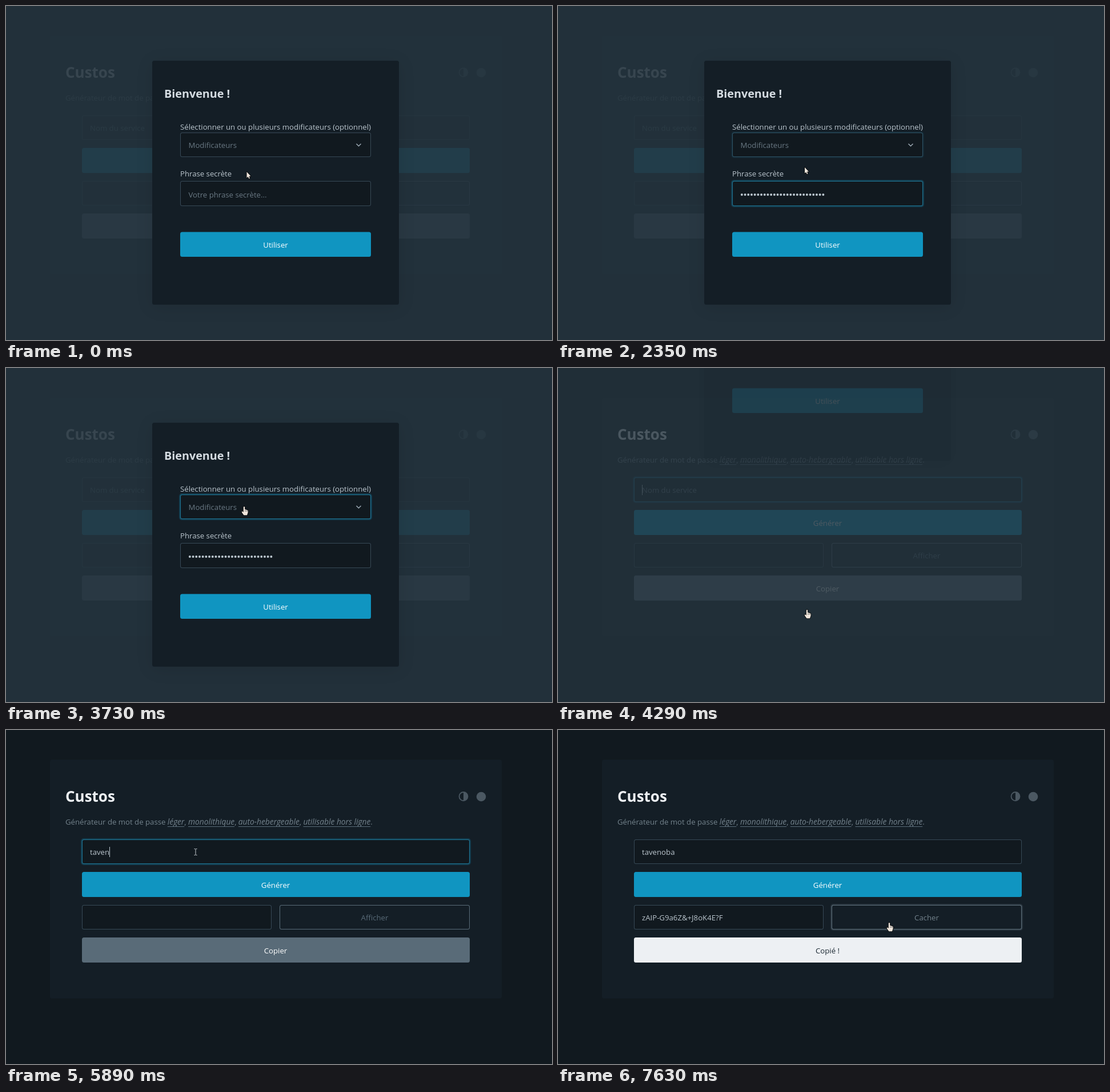
Write an HTML page with a canvas that moves like this. It is 956 by 586 pixels and loops after 8000 ms.

```html
<!DOCTYPE html>
<html lang="fr">
<head>
<meta charset="utf-8">
<title>Custos</title>
<style>
html, body { margin: 0; width: 100%; height: 100%; overflow: hidden; background: #11191f; }
canvas { display: block; width: 956px; height: 586px; }
</style>
</head>
<body>
<canvas id="stage" width="956" height="586"></canvas>
<script>
const W = 956, H = 586, LOOP = 8000;
const screen2d = document.getElementById('stage').getContext('2d');
const layer = document.createElement('canvas');
layer.width = W;
layer.height = H;
const layer2d = layer.getContext('2d');
let c = screen2d;

const BG = '#11191f', CARD = '#141e26', BLUE = '#1095c1', BORDER = '#374956';
const TEXT = '#bbc6ce', MUTED = '#73828c', HINT = '#697883', GREY = '#596b78', PALE = '#edf0f3';
const FAMILY = '"Open Sans", "Noto Sans", sans-serif';
const SERVICE = 'tavenoba', PASSWORD = 'zAIP-G9a6Z&+J8oK4E?F';
const KEY_TIMES = [5440, 5480, 5620, 5700, 5890, 5930, 6070, 6210];
const DOT = 5.7;

// time, x, y of the pointer's hot spot
const POINTER = [
  [0, 421.5, 291], [70, 421.5, 291], [200, 421, 336], [1840, 421, 336],
  [2350, 432, 283], [2480, 424, 248], [2660, 424, 248], [3100, 430, 414],
  [3430, 424, 330], [3480, 424, 330], [3700, 417, 243], [3790, 417, 243],
  [4060, 436, 424], [4340, 436, 424], [4880, 332, 214], [7110, 332, 214],
  [7440, 580, 338], [8000, 580, 338]
];

const ramp = (t, a, b) => Math.min(1, Math.max(0, (t - a) / (b - a)));
const ease = (t, a, b) => { const k = ramp(t, a, b); return k * k * (3 - 2 * k); };
const within = (v, a, b) => v >= a && v < b;

function font(size = 13.2, style = '') {
  c.font = `${style} ${size}px ${FAMILY}`;
}

function write(str, x, y, color, align = 'left') {
  c.fillStyle = color;
  c.textAlign = align;
  c.fillText(str, x, y);
}

function round(x, y, w, h, color, r = 3.5) {
  c.fillStyle = color;
  c.beginPath();
  c.roundRect(x, y, w, h, r);
  c.fill();
}

function box(x, y, w, h, border, fill, focus = 0, accent = BLUE) {
  if (focus > 0) {
    c.globalAlpha = 0.25 * focus;
    round(x - 2, y - 2, w + 4, h + 4, accent, 5);
    c.globalAlpha = 1;
  }
  round(x, y, w, h, border);
  if (focus > 0) {
    c.globalAlpha = 0.6 * focus;
    round(x, y, w, h, accent);
    c.globalAlpha = 1;
  }
  round(x + 1, y + 1, w - 2, h - 2, fill, 2.5);
}

function dots(n, x, y) {
  c.fillStyle = TEXT;
  c.beginPath();
  for (let i = 0; i < n; i++) {
    const cx = x + DOT * (i + 0.5);
    c.moveTo(cx + 2, y);
    c.arc(cx, y, 2, 0, 7);
  }
  c.fill();
}

function caret(x, y) {
  c.fillStyle = TEXT;
  c.fillRect(Math.round(x), y, 1, 18);
}

function subtitle() {
  let x = 104;
  const run = (str, linked) => {
    if (linked) font(13.8, 'italic');
    else font();
    write(str, x, 166, MUTED);
    const w = c.measureText(str).width;
    if (linked) {
      c.fillStyle = GREY;
      c.fillRect(x, 169, w, 1);
    }
    x += w;
  };
  run('Générateur de mot de passe ');
  run('léger', true);
  run(', ');
  run('monolithique', true);
  run(', ');
  run('auto-hebergeable', true);
  run(', ');
  run('utilisable hors ligne', true);
  run('.');
}

function icons() {
  c.fillStyle = c.strokeStyle = '#4b5862';
  c.lineWidth = 1.8;
  c.beginPath();
  c.arc(801, 116.5, 7.5, 0, 7);
  c.stroke();
  c.beginPath();
  c.arc(801, 116.5, 7.5, -Math.PI / 2, Math.PI / 2);
  c.fill();
  c.beginPath();
  c.arc(832, 117, 8.3, 0, 7);
  c.fill();
}

function page(t) {
  c.fillStyle = BG;
  c.fillRect(0, 0, W, H);
  round(77, 52, 791, 419, CARD);
  font(26, 'bold');
  write('Custos', 104, 125.5, PALE);
  icons();
  subtitle();

  const done = t >= 6480, shown = t >= 7470;
  const focus = ease(t, 4150, 4250) * (1 - ease(t, 6460, 6610));
  box(133, 192, 679, 43, BORDER, BG, focus);
  font();
  const typed = SERVICE.slice(0, KEY_TIMES.filter(k => k <= t).length);
  write(typed || 'Nom du service', 147, 219, typed ? TEXT : HINT);
  if (within(t, 4180, 4660) || within(t, 5160, 6480)) {
    caret(147 + c.measureText(typed).width, 205);
  }

  round(133, 249, 679, 44, BLUE);
  write('Générer', 472, 277, '#fff', 'center');

  box(133, 307, 332, 43, BORDER, BG);
  if (shown) {
    write(PASSWORD, 147, 334, TEXT);
  } else if (done) {
    c.fillStyle = '#113a4b';
    c.fillRect(147, 319, 114, 19);
    dots(PASSWORD.length, 147, 329);
  }

  box(479, 307, 333, 43, GREY, CARD, ease(t, 7450, 7630), '#65757f');
  write(shown ? 'Cacher' : 'Afficher', 645.5, 334, shown ? MUTED : GREY, 'center');

  round(133, 364, 679, 44, GREY);
  if (done) {
    c.globalAlpha = 0.25 + 0.75 * ease(t, 6480, 6610);
    round(133, 364, 679, 44, PALE);
    c.globalAlpha = 1;
  }
  write(done ? 'Copié !' : 'Copier', 472, 391.5, done ? '#1b2832' : '#fff', 'center');
}

function dropdown(t) {
  const py = pointer(t).y;
  c.shadowColor = 'rgba(0,0,0,.3)';
  c.shadowBlur = 14;
  round(305, 269, 334, 210, '#24333e');
  c.shadowColor = 'transparent';
  round(306, 270, 332, 208, '#1b2832', 2.5);
  const row = Math.floor((py - 275) / 39.6);
  if (row >= 0 && row < 5) {
    c.fillStyle = '#24333e';
    c.fillRect(306, 275 + row * 39.6, 332, 39.6);
  }
}

function modal(t) {
  c.clearRect(0, 0, W, H);
  c.shadowColor = 'rgba(0,0,0,.1)';
  c.shadowBlur = 30;
  c.shadowOffsetY = 4;
  round(256, 96, 432, 428, CARD);
  c.shadowColor = 'transparent';
  c.shadowOffsetY = 0;

  font(19.75, 'bold');
  write('Bienvenue !', 277, 161, '#d5dce2');
  font();
  write('Sélectionner un ou plusieurs modificateurs (optionnel)', 305, 217, TEXT);
  box(305, 222, 334, 43, BORDER, BG, ease(t, 2290, 2460) * (1 - ease(t, 4060, 4150)));
  write('Modificateurs', 319.5, 249, HINT);
  c.strokeStyle = '#a2afb9';
  c.lineWidth = 1.4;
  c.beginPath();
  c.moveTo(613.5, 241.7);
  c.lineTo(617.5, 245.7);
  c.lineTo(621.5, 241.7);
  c.stroke();

  write('Phrase secrète', 305, 299, TEXT);
  box(305, 307, 334, 44, BORDER, BG, ease(t, 330, 500) * (1 - ease(t, 2340, 2480)));
  if (t < 720) {
    write('Votre phrase secrète...', 319.5, 335.5, HINT);
  }
  const n = t < 720 ? 0 : t >= 1600 ? 26 : 1 + Math.floor(23 * ramp(t, 720, 1460));
  dots(n, 319, 331);
  if (within(t, 340, 2100)) caret(319 + n * DOT, 321);

  round(305, 396.5, 334, 43.5, BLUE);
  write('Utiliser', 472, 424, '#fff', 'center');
  if (within(t, 2400, 3700)) dropdown(t);
}

function pointer(t) {
  let i = 0;
  while (i < POINTER.length - 2 && POINTER[i + 1][0] <= t) i++;
  const [t0, x0, y0] = POINTER[i], [t1, x1, y1] = POINTER[i + 1];
  const k = ease(t, t0, t1);
  return { x: x0 + (x1 - x0) * k, y: y0 + (y1 - y0) * k };
}

function pointerKind(t, x, y) {
  if (t < 4330) {
    if (within(y, 222, 266) || within(y, 397, 440)) return 'hand';
    if (within(t, 2400, 3700) && within(y, 269, 479)) return 'hand';
    return within(y, 307, 351) ? 'beam' : 'arrow';
  }
  if (within(y, 192, 235)) return 'beam';
  if (within(y, 249, 293) || within(y, 364, 408)) return 'hand';
  if (within(y, 307, 350)) return x < 465 ? 'beam' : x >= 479 ? 'hand' : 'arrow';
  return 'arrow';
}

const SHAPES = {
  arrow: [0, 0, 0, 10.5, 2.3, 8.4, 3.9, 12, 5.5, 11.3, 4, 7.8, 7, 7.5],
  hand: [-1.2, .8, 0, 0, 1.2, .8, 1.2, 5, 5.8, 6.2, 6.8, 7.5, 6.5, 11, 5, 15.2,
    -.6, 15.2, -4, 10.5, -4.2, 8.8, -3, 8.4, -1.2, 10]
};

function drawPointer(t) {
  const { x, y } = pointer(t), kind = pointerKind(t, x, y);
  c.save();
  c.translate(x, y);
  c.lineJoin = 'round';
  c.beginPath();
  if (kind === 'beam') {
    c.fillStyle = '#c9ced2';
    c.fillRect(-0.5, -5, 1, 10);
    for (const dy of [-6, 5]) {
      c.fillRect(-2.5, dy, 2, 1);
      c.fillRect(0.5, dy, 2, 1);
    }
  } else {
    const p = SHAPES[kind];
    for (let i = 0; i < p.length; i += 2) c.lineTo(p[i], p[i + 1]);
    c.closePath();
    c.strokeStyle = '#05080a';
    c.lineWidth = 1.8;
    c.stroke();
    c.fillStyle = '#f0e6dc';
    c.fill();
    if (kind === 'hand') {
      c.fillStyle = '#30363a';
      for (const fx of [1.4, 3.2, 5]) c.fillRect(fx, 6.4, 0.6, 2.6);
    }
  }
  c.restore();
}

function draw(t) {
  c = screen2d;
  page(t);
  const veil = 0.9 * (1 - ease(t, 4240, 4500));
  if (veil > 0) {
    c.fillStyle = `rgba(36,51,61,${veil})`;
    c.fillRect(0, 0, W, H);
  }
  const lift = ease(t, 4141, 4341);
  if (lift < 1) {
    c = layer2d;
    modal(t);
    c = screen2d;
    c.globalAlpha = 1 - lift;
    c.drawImage(layer, 0, Math.round(-428 * lift));
    c.globalAlpha = 1;
  }
  drawPointer(t);
}

const start = performance.now();
function tick() {
  draw((performance.now() - start) % LOOP);
  requestAnimationFrame(tick);
}
tick();
</script>
</body>
</html>
```
